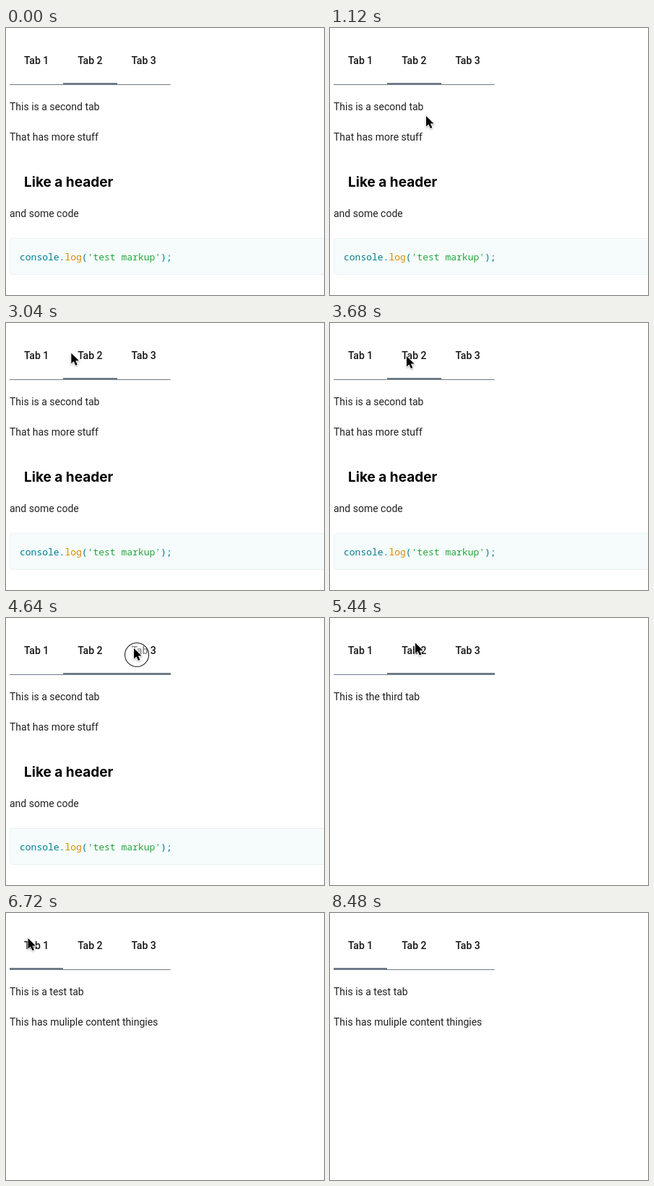
Recreate the animation shown at these times as an HTML page. Size 440 by 370 pixels, loop 8.8 s.

```html
<!DOCTYPE html>
<html lang="en">
<head>
<meta charset="utf-8">
<title>Tabs</title>
<style>
  html, body { margin: 0; width: 100%; height: 100%; overflow: hidden; background: #fff; }
  svg { display: block; }
  text { font: 14px Roboto, sans-serif; fill: #212121; white-space: pre; }
  .tab { font-weight: 500; fill: #151515; }
  .head { font: 700 19px Inter, sans-serif; fill: #000; }
  .code { font: 13px "Roboto Mono", "Noto Sans Mono", monospace; fill: #007a91; }
  .fn { fill: #d88a00; }
  .str { fill: #23a53a; }
  .line { fill: #6e7b87; }
  #cursor { filter: drop-shadow(0 1px 1px rgba(0, 0, 0, .3)); }
</style>
</head>
<body>
<svg width="440" height="370" viewBox="0 0 440 370">
  <rect width="440" height="370" fill="#fff"/>
  <g id="tabs"><rect class="line" x="5" y="78" width="222.6" height="1"/></g>
  <g class="panel">
    <text x="5" y="113.5">This is a test tab</text>
    <text x="5" y="155.5">This has muliple content thingies</text>
  </g>
  <g class="panel">
    <text x="5" y="113.5">This is a second tab</text>
    <text x="5" y="155.5">That has more stuff</text>
    <text class="head" x="25" y="219.5">Like a header</text>
    <text x="5" y="261.5">and some code</text>
    <rect x="5.5" y="291.5" width="450" height="50" rx="3" fill="#f5fcfb" stroke="#eaf2f1"/>
    <text class="code" x="19" y="321.5">console.<tspan class="fn">log</tspan>(<tspan class="str">'test markup'</tspan>);</text>
  </g>
  <g class="panel">
    <text x="5" y="113.5">This is the third tab</text>
  </g>
  <circle id="ring" cx="181" cy="51" r="16.5" fill="#fff" fill-opacity=".5" stroke="#222" stroke-width="1.1"/>
  <path id="cursor" d="M0 0V14.5L3.4 11.4L6 17L8.4 16L5.9 10.5H10.6Z" fill="#000" stroke="#fff" stroke-width="1.8" paint-order="stroke"/>
</svg>
<script>
const LOOP = 8800, STEP = 160, TAB_W = 74.25;
const NS = "http://www.w3.org/2000/svg";
const $ = id => document.getElementById(id);
const panels = document.querySelectorAll(".panel");

// Pointer stops: time, x, y
const path = [
  [640, 270, 291], [800, 193, 194], [960, 193, 194],
  [1120, 133, 122], [1280, 82, 67], [1440, 52, 45], [1600, 43, 40], [1760, 39, 49],
  [2720, 39, 49], [3200, 116, 38], [3360, 130, 40], [3680, 106, 46], [3840, 105, 47],
  [4000, 114, 47], [4480, 177, 42], [5120, 177, 42],
  [5440, 118, 34.5], [5920, 118, 34.5],
  [6400, 30.5, 35], [7680, 30.5, 35],
  [7840, 62, 76], [8320, 271, 346]
];
// Selected tab: start time, index
const picks = [[0, 1], [4800, 2], [5760, 1], [6720, 0]];

function add(tag, attrs, text = "") {
  const el = document.createElementNS(NS, tag);
  for (const k in attrs) el.setAttribute(k, attrs[k]);
  el.textContent = text;
  return $("tabs").appendChild(el);
}

const bars = [0, 1, 2].map(i => {
  const x = 5 + i * TAB_W;
  add("text", { class: "tab", x: x + 20, y: 49.5 }, "Tab " + (i + 1));
  const left = Math.round(x), right = Math.round(x + TAB_W);
  return add("rect", { class: "line", x: left, y: 76, width: right - left, height: 3 });
});

function pointer(t) {
  if (t < path[0][0] || t > path.at(-1)[0]) return null;
  const i = Math.max(1, path.findIndex(p => p[0] >= t));
  const [t0, x0, y0] = path[i - 1], [t1, x1, y1] = path[i];
  const k = (t - t0) / (t1 - t0);
  return { x: x0 + (x1 - x0) * k, y: y0 + (y1 - y0) * k };
}

const show = (el, on) => el.setAttribute("visibility", on ? "visible" : "hidden");

function draw(ms) {
  const t = Math.floor((ms % LOOP) / STEP) * STEP;
  const p = pointer(t);
  const active = picks.findLast(s => t >= s[0])[1];
  const hover = p && p.y < 78 ? Math.floor((p.x - 5) / TAB_W) : -1;
  panels.forEach((el, i) => show(el, i === active));
  bars.forEach((el, i) => show(el, i === active || i === hover));
  show($("ring"), t === 4640);
  show($("cursor"), p);
  if (p) $("cursor").setAttribute("transform", `translate(${p.x} ${p.y})`);
}

const start = performance.now();
function tick() {
  draw(performance.now() - start);
  requestAnimationFrame(tick);
}
tick();
</script>
</body>
</html>
```
